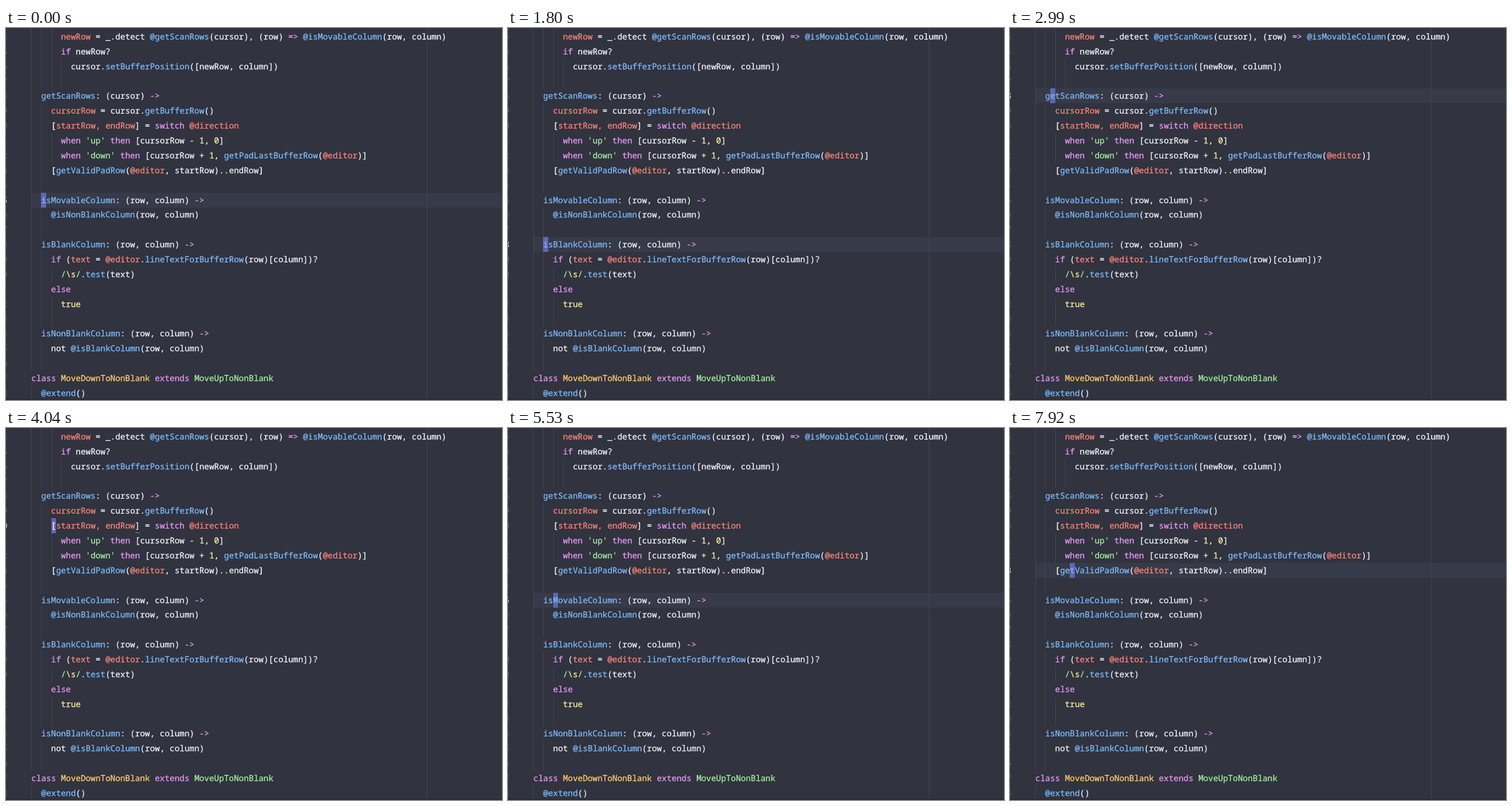
An HTML page for the animation above (8000 ms loop, 864 by 648 pixels).

```html
<!DOCTYPE html>
<html lang="en">
<head>
<meta charset="utf-8">
<title>Code editor cursor</title>
<style>
  html, body { margin: 0; width: 100%; height: 100%; overflow: hidden; background: #31333f; }
  svg { display: block; width: 864px; height: 648px; }
  text {
    font: 14.35px "Noto Sans Mono", "DejaVu Sans Mono", monospace;
    text-rendering: geometricPrecision;
    white-space: pre;
    color: #f0f3fb;
  }
  text, tspan { fill: currentColor; stroke: currentColor; stroke-width: 0.3px; }
  .k { color: #e898f5; }
  .f { color: #7cbcff; }
  .v { color: #fb8578; }
  .s { color: #a5f0a0; }
  .n { color: #fff09a; }
  .c { color: #ffd06c; }
  .number { color: #5b6074; }
  .number.active { color: #d0d5e2; }
</style>
</head>
<body>
<svg id="stage" viewBox="0 0 864 648"></svg>
<script>
const LOOP = 8000;
const CHAR = 8.61, LINE = 25.87, LEFT = 44.1, TOP = 1.95, HEIGHT = 26;
const FIRST_DIGIT = 4;

// {x text} colours a span with class x.
const lines = String.raw`
      {v newRow} = _.detect {f @getScanRows}(cursor), (row) {k =>} {f @isMovableColumn}(row, column)
      {k if} newRow?
        cursor.{f setBufferPosition}([newRow, column])

  {f getScanRows}: (cursor) {k ->}
    {v cursorRow} = cursor.{f getBufferRow}()
    [{v startRow, endRow}] = {k switch} {v @direction}
      {k when} {s 'up'} {k then} [cursorRow - {n 1}, {n 0}]
      {k when} {s 'down'} {k then} [cursorRow + {n 1}, {f getPadLastBufferRow}({v @editor})]
    [{f getValidPadRow}({v @editor}, startRow)..endRow]

  {f isMovableColumn}: (row, column) {k ->}
    {f @isNonBlankColumn}(row, column)

  {f isBlankColumn}: (row, column) {k ->}
    {k if} ({v text} = {v @editor}.{f lineTextForBufferRow}(row)[column])?
      {s /}{n \s}{s /}.{f test}(text)
    {k else}
      {n true}

  {f isNonBlankColumn}: (row, column) {k ->}
    not {f @isBlankColumn}(row, column)

{k class} {c MoveDownToNonBlank} {k extends} {s MoveUpToNonBlank}
  {f @extend}()`.slice(1).split("\n");

// Start time, row, column and, on a bracket, the column of its partner.
const moves = [
  { at: 0, row: 11, col: 2 },
  { at: 600, row: 14, col: 2 },
  { at: 1050, row: 20, col: 2 },
  { at: 1800, row: 14, col: 2 },
  { at: 2090, row: 11, col: 2 },
  { at: 2240, row: 4, col: 2 },
  { at: 2990, row: 4, col: 3 },
  { at: 3290, row: 4, col: 4 },
  { at: 4040, row: 6, col: 4, match: 21 },
  { at: 4480, row: 9, col: 4, match: 46 },
  { at: 5530, row: 11, col: 4 },
  { at: 6280, row: 12, col: 4 },
  { at: 7020, row: 12, col: 5 },
  { at: 7170, row: 12, col: 7 },
  { at: 7470, row: 11, col: 7 },
  { at: 7920, row: 9, col: 7 }
];

const stage = document.getElementById("stage");
const colX = col => Math.round(LEFT + col * CHAR);
const rowY = row => Math.round(TOP + row * LINE);

function add(parent, tag, attrs = {}, content = "") {
  const node = document.createElementNS("http://www.w3.org/2000/svg", tag);
  set(node, attrs);
  node.textContent = content;
  return parent.appendChild(node);
}

function set(node, attrs) {
  for (const name in attrs) node.setAttribute(name, attrs[name]);
}

function rect(x, y, width, height, fill) {
  return add(stage, "rect", { x, y, width, height, fill });
}

function drawLine(source, row) {
  const indent = source.search(/\S/);
  const text = add(stage, "text", { x: LEFT + indent * CHAR, y: rowY(row) + 18 });
  for (const [plain, kind, word] of source.trim().matchAll(/\{(\w) ([^}]*)\}|[^{]+/g)) {
    add(text, "tspan", kind ? { class: kind } : {}, word ?? plain);
  }
}

rect(0, 0, 864, 648, "#31333f");
const activeLine = rect(44, 0, 820, HEIGHT, "#373a48");

// Blank lines keep the indent guides of the line above.
let depth = 0;
lines.forEach((source, row) => {
  if (source.trim()) depth = source.search(/\S/);
  for (let col = 0; col < depth; col += 2) {
    rect(colX(col), rowY(row), 1, rowY(row + 1) - rowY(row), "#444754");
  }
});
rect(733, 0, 1, 648, "#414451");

const cursor = rect(0, 0, 9, HEIGHT, "#5f66b0");
const numbers = lines.map((source, row) =>
  add(stage, "text", { x: -6.2, y: rowY(row) + 18, class: "number" }, (FIRST_DIGIT + row) % 10));
lines.forEach((source, row) => source.trim() && drawLine(source, row));
const underlines = [0, 1].map(() => rect(0, 0, 8, 1, "#7880e0"));
rect(0, 646.5, 864, 1.5, "#2a2831");

let shown;
function render(time) {
  const move = moves.findLast(m => m.at <= time % LOOP);
  if (move === shown) return;
  shown = move;
  const { row, col, match } = move;
  const x = colX(col), y = rowY(row);
  // A matched bracket pair replaces the line highlight.
  set(activeLine, { y, visibility: match ? "hidden" : "visible" });
  set(cursor, { x, y, width: colX(col + 1) - x });
  numbers.forEach((node, i) => node.classList.toggle("active", i === row));
  underlines.forEach((node, i) => set(node, {
    x: colX(i ? match ?? 0 : col),
    y: y + HEIGHT - 1,
    visibility: match ? "visible" : "hidden"
  }));
}

const start = performance.now();
function tick() {
  render(performance.now() - start);
  requestAnimationFrame(tick);
}
tick();
</script>
</body>
</html>
```
